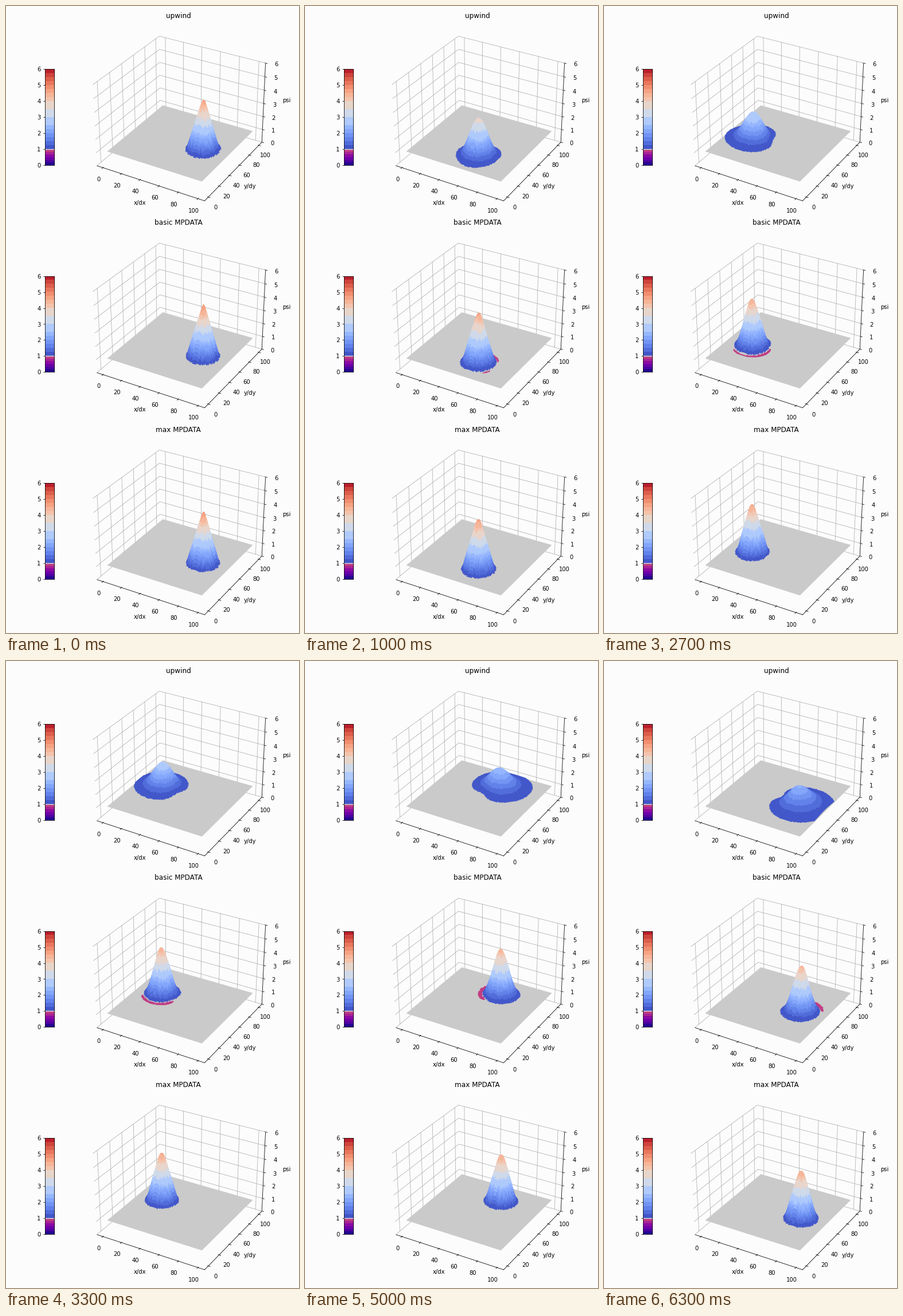
Animation of 511x1095 px, one loop 6.4 s. Source, as a matplotlib script:

```python
import numpy as np
import matplotlib.pyplot as plt
from matplotlib.animation import FuncAnimation
from matplotlib.collections import PolyCollection
from mpl_toolkits.mplot3d import proj3d
from mpl_toolkits.mplot3d.art3d import Poly3DCollection

W, H, DPI = 511, 1095, 72
FRAMES, INTERVAL = 64, 100
N, PAD = 100, 12        # visible cells per side, hidden margin cells
STEPS = 10              # solver steps per frame
EPS = 0.035             # |psi - 1| below this is background
PLANE, GRID, BG = "#cacaca", "#b0b0b0", "#fcfcfc"
SIDE, LEFT, TOP, PITCH = 334.6, 133.2, 26.8, 361.4
TITLES = ("upwind", "basic MPDATA", "max MPDATA")
BANDS = np.r_[1:2.5:0.25, 2.5:4:0.5, 4:6.1:0.25]

plt.rcParams.update({"font.family": "DejaVu Sans", "font.size": 10,
                     "figure.facecolor": BG, "axes.facecolor": BG})

# ---------------------------------------------------------------- solver

cells = np.arange(-PAD, N + PAD) + 0.5
GX, GY = np.meshgrid(cells, cells, indexing="ij")
INSIDE = np.hypot(GX - 50, GY - 50) < 60
COURANT = (0.01 * (GY - 50), -0.01 * (GX - 50))    # clockwise solid rotation


def at(a, shift, axis):
    """Values of a at index + shift along axis."""
    return np.roll(a, -shift, axis)


def pos(a):
    return np.maximum(a, 0)


def neg(a):
    return np.minimum(a, 0)


def divergence(flux):
    return sum(f - at(f, -1, d) for d, f in enumerate(flux))


def donor_cell(psi, c):
    return psi - divergence([pos(v) * psi + neg(v) * at(psi, 1, d)
                             for d, v in enumerate(c)])


def antidiffusive(psi, c, gauge=False):
    out = []
    for d, v in enumerate(c):
        e = 1 - d
        nxt = at(psi, 1, d)
        pair = psi + nxt
        up, down = at(pair, 1, e), at(pair, -1, e)
        w = c[e] + at(c[e], 1, d)
        cross = 0.25 * (w + at(w, -1, e))
        den_a, den_b = (2, 4) if gauge else (pair, up + down)
        speed = np.abs(v)
        corr = (speed * (1 - speed) * (nxt - psi) / den_a
                - 0.5 * v * cross * (up - down) / den_b)
        if gauge:   # third-order term
            bend = at(psi, 2, d) - pair + at(psi, -1, d)
            corr += (3 * v * speed - 2 * v**3 - v) / 12 * bend
        out.append(corr)
    return out


def limited(flux, old, new):
    """Flux limiter keeping psi within its local bounds."""
    def bound(pick):
        a = pick(old, new)
        r = a
        for d in (0, 1):
            r = pick(r, pick(at(a, 1, d), at(a, -1, d)))
        return r

    inflow = sum(pos(at(f, -1, d)) - neg(f) for d, f in enumerate(flux))
    outflow = sum(pos(f) - neg(at(f, -1, d)) for d, f in enumerate(flux))
    rise = np.minimum(1, (bound(np.maximum) - new) / (inflow + 1e-12))
    fall = np.minimum(1, (new - bound(np.minimum)) / (outflow + 1e-12))
    return [pos(f) * np.minimum(fall, at(rise, 1, d))
            + neg(f) * np.minimum(rise, at(fall, 1, d))
            for d, f in enumerate(flux)]


def upwind(psi):
    return donor_cell(psi, COURANT)


def basic(psi):
    psi = donor_cell(psi, COURANT)
    return donor_cell(psi, antidiffusive(psi, COURANT))


def best(psi):
    new = donor_cell(psi, COURANT)
    flux = antidiffusive(new, COURANT, gauge=True)
    return new - divergence(limited(flux, psi, new))


def history(step):
    psi = 1 + pos(4 - np.hypot(GX - 75, GY - 50) * 4 / 15)
    snaps = []
    for _ in range(FRAMES):
        for _ in range(STEPS):
            psi = np.where(INSIDE, step(psi), 1)
        snaps.append(psi[PAD:-PAD, PAD:-PAD])
    return snaps


X, Y = GX[PAD:-PAD, PAD:-PAD], GY[PAD:-PAD, PAD:-PAD]
runs = [history(step) for step in (upwind, basic, best)]

# ---------------------------------------------------------------- colours


def paint(v):
    i = np.clip(np.digitize(v, BANDS) - 1, 0, len(BANDS) - 2)
    level = (BANDS[i] + BANDS[i + 1]) / 2
    high = plt.cm.coolwarm((level - 1) / 5)
    low = plt.cm.plasma((np.floor(v * 6) + 0.5) / 12)
    return np.where((v < 1)[:, None], low, high)


# ---------------------------------------------------------------- static part

fig = plt.figure(figsize=((W + 1e-6) / DPI, (H + 1e-6) / DPI), dpi=DPI)


def rect(x, y, w, h):
    """Pixel box, y measured from the top, as figure fractions."""
    return [x / W, 1 - (y + h) / H, w / W, h / H]


def add_panel(top, title):
    ax = fig.add_axes(rect(LEFT, top, SIDE, SIDE), projection="3d")
    ax.set_title(title).set_y(1)
    lo, hi = -6.72, 106.72
    ticks = range(0, 101, 20)
    ax.set(xlim=(lo, hi), ylim=(lo, hi), zlim=(0, 6), xticks=ticks,
           yticks=ticks, zticks=range(7),
           xlabel="x/dx", ylabel="y/dy", zlabel="psi")
    for axis in (ax.xaxis, ax.yaxis, ax.zaxis):
        axis.set_pane_color((1, 1, 1, 0))

    # grid on the two walls only
    ax.grid(False)
    walls = [([t, t], [hi, hi], [0, 6]) for t in ticks]
    walls += [([lo, lo], [t, t], [0, 6]) for t in ticks]
    walls += [([lo, lo, hi], [lo, hi, hi], [z] * 3) for z in range(7)]
    for line in walls:
        ax.plot(*line, color=GRID, lw=0.8)

    a, b = X[0, 0], X[-1, 0]
    floor = [(a, a, 1), (b, a, 1), (b, b, 1), (a, b, 1)]
    ax.add_collection3d(Poly3DCollection([floor], facecolors=PLANE,
                                         edgecolors=PLANE, linewidths=0.5))
    ax.set(xlim=(lo, hi), ylim=(lo, hi), zlim=(0, 6))
    return ax


def add_bar(top):
    ax = fig.add_axes(rect(67.6, top + SIDE / 4, SIDE / 20, SIDE / 2))
    v = np.linspace(0, 6, 1200, endpoint=False)
    ax.imshow(paint(v)[:, None], extent=(0, 1, 0, 6), origin="lower",
              aspect="auto", interpolation="nearest")
    ax.axhline(1, color="#dcdcdc", lw=1.4)
    ax.set(xticks=[], yticks=range(7))


views = []
for k, title in enumerate(TITLES):
    add_bar(TOP + k * PITCH)
    views.append(add_panel(TOP + k * PITCH, title))

# The axes never change: render them once and keep the picture as a backdrop.
fig.canvas.draw()
backdrop = np.array(fig.canvas.buffer_rgba())
views = [(ax.get_proj(), ax.transData.frozen()) for ax in views]
fig.clear()
fig.figimage(backdrop, origin="upper")

# ---------------------------------------------------------------- moving part

stage = fig.add_axes([0, 0, 1, 1], zorder=1)
stage.set(xlim=(0, W), ylim=(0, H))
stage.axis("off")
cones = PolyCollection([], edgecolors="face", linewidths=0.7)
stage.add_collection(cones, autolim=False)


def corners(a):
    return np.stack([a[:-1, :-1], a[1:, :-1], a[1:, 1:], a[:-1, 1:]], axis=2)


def surface(psi, view):
    """Visible quads of one surface, far to near, with their colours."""
    proj, to_px = view
    px, py, pz = proj3d.proj_transform(X.ravel(), Y.ravel(), psi.ravel(), proj)
    xy = to_px.transform(np.c_[px, py]).reshape(N, N, 2)
    level = corners(psi).mean(axis=2)
    keep = np.abs(level - 1) > EPS
    depth = corners(np.reshape(pz, (N, N))).mean(axis=2)[keep]
    order = np.argsort(-depth)
    return corners(xy)[keep][order], paint(level[keep][order])


def update(i):
    parts = [surface(run[i], view) for run, view in zip(runs, views)]
    cones.set_verts(np.concatenate([p[0] for p in parts]))
    cones.set_facecolor(np.concatenate([p[1] for p in parts]))
    return [cones]


anim = FuncAnimation(fig, update, frames=FRAMES, interval=INTERVAL,
                     repeat=True, repeat_delay=0, blit=False)
plt.show()
```
